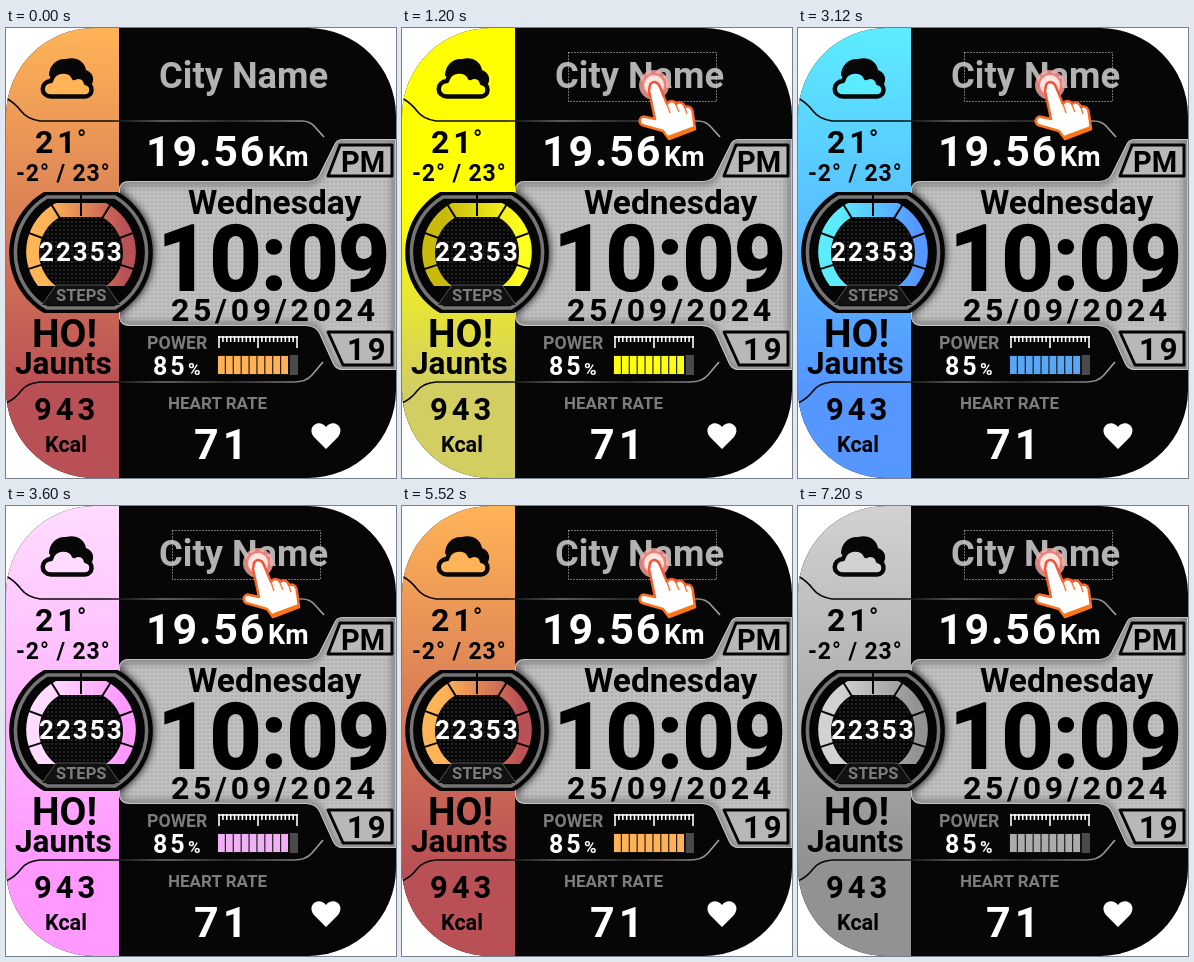
An HTML page for the animation above (8 s loop, 390 by 450 pixels).

```html
<!DOCTYPE html>
<html lang="en">
<head>
<meta charset="utf-8">
<title>Watch face colour themes</title>
<style>
  html, body { margin: 0; width: 100%; height: 100%; overflow: hidden; background: #fff; }
  svg { display: block; width: 390px; height: 450px; }
  text { font-family: Roboto, "Open Sans", sans-serif; font-weight: 700; white-space: pre; }
  .light { fill: #fff; }
  .dim { fill: #7c7c7c; }
  .city { fill: #b2b2b2; }
  .clock { stroke: #000; stroke-width: 2; }
  .top { stop-color: var(--top); }
  .bottom { stop-color: var(--bottom); }
  .left { stop-color: var(--left); }
  .right { stop-color: var(--right); }
</style>
</head>
<body>
<svg id="watch" viewBox="0 0 390 450">
  <defs>
    <clipPath id="face"><rect width="390" height="450" rx="88"/></clipPath>
    <linearGradient id="side" x2="0" y2="1">
      <stop class="top" id="hold"/><stop class="bottom" offset=".8"/>
    </linearGradient>
    <linearGradient id="ring">
      <stop offset=".2" class="left"/><stop offset=".9" class="right"/>
    </linearGradient>
    <linearGradient id="edge" gradientUnits="userSpaceOnUse" x1="0" x2="320">
      <stop offset=".32" stop-color="#080808"/><stop offset=".5" stop-color="#777"/>
      <stop offset=".7" stop-color="#333"/><stop offset="1" stop-color="#aaa"/>
    </linearGradient>
    <linearGradient id="flame" x2="0" y2="1">
      <stop stop-color="#f0523c"/><stop offset="1" stop-color="#ff7a10"/>
    </linearGradient>
    <pattern id="mesh" width="4" height="4" patternUnits="userSpaceOnUse">
      <circle cx="2" cy="2" r="1.1" fill="#808080" opacity=".32"/>
    </pattern>
    <filter id="soft" x="-20%" y="-20%" width="140%" height="140%"><feGaussianBlur stdDeviation="4"/></filter>
    <path id="plate" d="M113 161Q114 153 123 153H300Q309 153 313 147L328 117Q330 111 337 111H390V342H337Q330 342 327 336L313 305Q309 298 300 298H123Q114 297 113 290Z"/>
    <clipPath id="plateClip"><use href="#plate"/></clipPath>
    <path id="case" d="M38 164H112A70 70 0 0 1 112 285H38A70 70 0 0 1 38 164Z"/>
  </defs>

  <g clip-path="url(#face)">
    <rect width="390" height="450" fill="#060606"/>
    <rect width="113" height="450" fill="url(#side)"/>
    <g fill="none" stroke="url(#edge)" stroke-width="1.6">
      <path d="M0 70Q9 75 15 83T34 93H296Q304 93 309 99L318 109"/>
      <path d="M0 375Q9 371 15 363T34 354H288Q300 354 306 347L317 334"/>
    </g>

    <g id="panel" clip-path="url(#plateClip)">
      <use href="#plate" fill="#c0c0c0"/>
      <path d="M113 153H390V298H113Z" fill="url(#mesh)"/>
      <use href="#plate" fill="none" stroke="#555" stroke-width="5" filter="url(#soft)"/>
      <use href="#case" filter="url(#soft)"/>
      <use href="#plate" fill="none" stroke="#c4c4c4" stroke-width="2"/>
      <g fill="#b8b8b8" stroke="#050505" stroke-width="3" stroke-linejoin="round">
        <path d="M334 117H386V148H322Z"/>
        <path d="M322 304H386V337H337Z"/>
      </g>
    </g>

    <g id="gauge">
      <use href="#case" fill="#050505"/>
      <path d="M41 169H109A64.500 64.500 0 0 1 109 280H41A64.500 64.500 0 0 1 41 169Z" fill="none" stroke="#747474" stroke-width="3.500"/>
      <path d="M54 189H96A41 41 0 0 1 98 258H52A41 41 0 0 1 54 189Z" fill="url(#mesh)"/>
      <path d="M50 175H100A55 55 0 0 1 118 258H100A41 41 0 0 0 96 189H54A41 41 0 0 0 50 258H32A55 55 0 0 1 50 175Z" fill="url(#ring)"/>
      <g id="spokes" stroke="#050505" stroke-width="2"></g>
      <path d="M36 277L50 257H100L114 277" fill="#111" stroke="#555"/>
    </g>

    <g id="cloud" fill="#070707">
      <path d="M43 48C43 37 51 30 60 31C69 28 79 33 80 42C86 44 89 50 86 56Z"/>
      <path d="M45 68.500C34 68 34 54 45 53C48 41 64 41 68 50C74 47 79 50 80 55C88 57 87 68 79 68.500Z"
        stroke="#070707" stroke-width="4.500" stroke-linejoin="round" style="fill: var(--top)"/>
    </g>

    <path id="scale" fill="none" stroke="#fff" stroke-width="1.6"/>
    <rect x="211" y="327" width="81" height="20" fill="#4a4a4a"/>
    <rect x="211" y="327" width="73" height="20" fill="#111"/>
    <g id="bars" style="fill: var(--bar)"></g>
    <path d="M320 421L308 409C300 399 313 390 320 399C327 390 340 399 332 409Z" fill="#fff"/>
    <g id="labels"></g>
  </g>

  <g id="tap">
    <rect x="166.500" y="24.500" width="148" height="49" fill="none" stroke="#ddd" stroke-dasharray="1 2"/>
    <g transform="translate(0 2)">
      <circle cx="252" cy="55" r="15" fill="#f9a9a2" opacity=".8"/>
      <circle cx="252" cy="55" r="11" fill="#ffe4e0" stroke="#ee8078" stroke-width="2"/>
      <path d="M248 55C251 50 256 52 258 57L265 74C267 70 272 70 274 74C277 71 282 73 283 77C288 75 291 79 291 84L293 99L267 109L261 101L240 95C235 91 239 85 244 87L253 89L247 61Z" fill="#fff" stroke="url(#flame)" stroke-width="2.500" stroke-linejoin="round"/>
      <path d="M265 74L268 83M274 75L277 82M283 78L285 84" fill="none" stroke="#ff7a3a" stroke-width="1.500"/>
      <path d="M266 108L293 98" stroke="#ff7514" stroke-width="4"/>
    </g>
  </g>
</svg>
<script>
const LOOP = 8000, STEP = 1200;
// hold: how far down the side panel its top colour lasts
const theme = (top, bottom, bar, left = top, right = bottom, hold = 0) =>
  ({ top, bottom, bar, left, right, hold });
const sunset = theme("#ffb457", "#b95055", "#ffb257");
const themes = [
  sunset,
  theme("#ffff00", "#d2ce62", "#ffff10", "#c8b90a", "#ffff20", .4),
  theme("#5cecff", "#5596ff", "#58a6f4"),
  theme("#ffdcff", "#ff98ff", "#f0b0f4"),
  sunset,
  theme("#98ea00", "#8b9600", "#92cf12"),
  theme("#d2d2d2", "#929292", "#acacac"),
];

const $ = id => document.getElementById(id);

function add(parent, tag, attrs) {
  const node = document.createElementNS("http://www.w3.org/2000/svg", tag);
  for (const key in attrs) node.setAttribute(key, attrs[key]);
  return $(parent).appendChild(node);
}

function label(text, x, y, size, spacing = 0, style = "") {
  add("labels", "text", { x, y, "font-size": size, "letter-spacing": spacing, class: style }).textContent = text;
}

label("21", 29, 125, 32, 4);
label("°", 71, 119, 24);
label("-2° / 23°", 10, 153, 23, .9);
label("HO!", 26, 319, 39);
label("Jaunts", 9, 346, 31.5);
label("943", 28, 392, 31, 4);
label("Kcal", 39, 424, 21.5);
label("PM", 335, 144, 29);
label("Wednesday", 182, 186, 33.5);
label("10:09", 152, 262, 90, 0, "clock");
label("25/09/2024", 165, 293, 32, 3.7);
label("19", 341, 332, 31, 3);
label("City Name", 153, 60, 36.3, 0, "city");
label("19.56", 140, 138, 43, 1.8, "light");
label("Km", 262, 138, 27, 0, "light");
label("22353", 33, 233, 26, 2, "light");
label("STEPS", 50, 273, 16.5, 0, "dim");
label("POWER", 141, 321, 17.7, 0, "dim");
label("85", 147, 347, 25, 3, "light");
label("%", 182, 347, 17, 0, "light");
label("HEART RATE", 162, 381, 17, 0, "dim");
label("71", 188, 431, 43, 4, "light");

for (const angle of [-108, -70, -32, 0, 32, 70, 108])
  add("spokes", "path", { d: "M75 188V166", transform: `rotate(${angle} 75 224)` });

let ticks = "M212 309H292";
for (let i = 0; i <= 20; i++) ticks += `M${213 + i * 3.9} 308V${i % 10 ? 314 : 320}`;
$("scale").setAttribute("d", ticks);

for (let i = 0; i < 9; i++)
  add("bars", "rect", { x: 212 + i * 7.9, y: 328, width: 6.8, height: 18 });

let shown = -1;
function draw(now) {
  const index = Math.floor(now % LOOP / STEP);
  if (index !== shown) {
    shown = index;
    const { hold, ...colors } = themes[index];
    for (const name in colors) $("watch").style.setProperty("--" + name, colors[name]);
    $("hold").setAttribute("offset", hold);
    $("tap").style.display = index ? "" : "none";
  }
  requestAnimationFrame(draw);
}
draw(performance.now());
</script>
</body>
</html>
```
